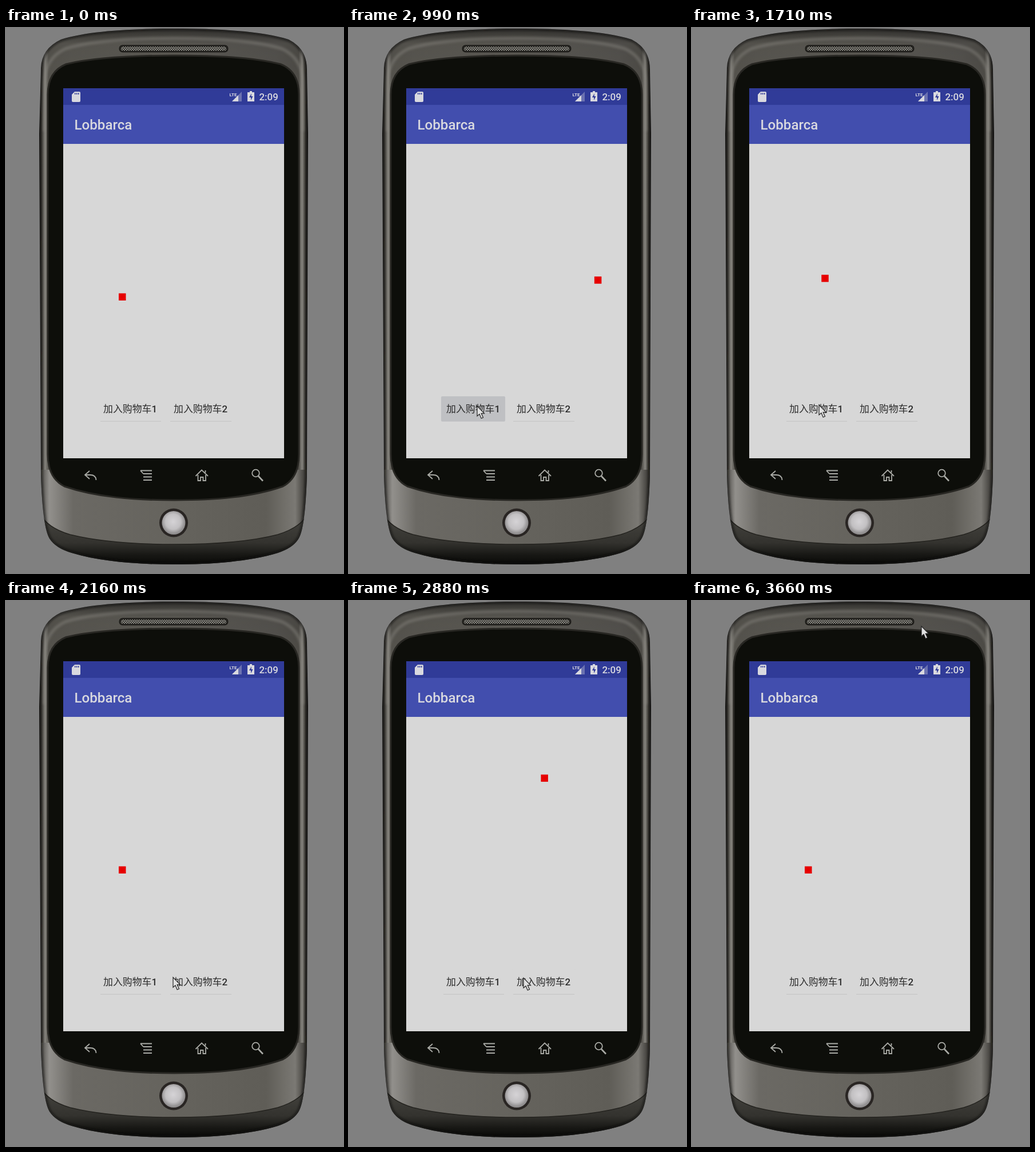
These frames come from a looping animation (589 by 950 pixels, 3690 ms). An HTML page:

```html
<!DOCTYPE html>
<html lang="zh-CN">
<head>
<meta charset="utf-8">
<title>Toss animation</title>
<style>
  html, body { margin: 0; width: 100%; height: 100%; overflow: hidden; background: #808080; }
  svg { display: block; width: 589px; height: 950px; }
  text { font-family: Roboto, "Noto Sans CJK SC", "Noto Sans CJK", sans-serif; font-weight: 500; }
  .nav { fill: none; stroke: #aaaba6; stroke-width: 1.8; }
  .label { font-size: 16.9px; fill: #2c2c2c; }
  .press { fill: #bfc0c3; opacity: 0; }
</style>
</head>
<body>
<svg viewBox="0 0 589 950">
  <defs>
    <linearGradient id="metal" gradientUnits="userSpaceOnUse" x1="58" y1="0" x2="528" y2="0">
      <stop offset="0" stop-color="#171613"/>
      <stop offset=".01" stop-color="#42403b"/>
      <stop offset=".022" stop-color="#85837d"/>
      <stop offset=".035" stop-color="#57554f"/>
      <stop offset=".12" stop-color="#5b5953"/>
      <stop offset=".5" stop-color="#5f5d57"/>
      <stop offset=".88" stop-color="#565450"/>
      <stop offset=".965" stop-color="#4f4d48"/>
      <stop offset=".978" stop-color="#85837d"/>
      <stop offset=".99" stop-color="#3b3934"/>
      <stop offset="1" stop-color="#12110f"/>
    </linearGradient>
    <linearGradient id="topShade" x1="0" y1="0" x2="0" y2="1">
      <stop offset="0" stop-color="#000" stop-opacity=".5"/>
      <stop offset=".25" stop-color="#000" stop-opacity=".08"/>
      <stop offset=".6" stop-color="#000" stop-opacity=".05"/>
      <stop offset="1" stop-color="#000" stop-opacity="0"/>
    </linearGradient>
    <linearGradient id="chin" gradientUnits="userSpaceOnUse" x1="62" y1="0" x2="524" y2="0">
      <stop offset="0" stop-color="#55534f"/>
      <stop offset=".03" stop-color="#92908c"/>
      <stop offset=".12" stop-color="#6b6964"/>
      <stop offset=".5" stop-color="#65635d"/>
      <stop offset=".85" stop-color="#5f5d57"/>
      <stop offset=".96" stop-color="#7b7974"/>
      <stop offset="1" stop-color="#3a3834"/>
    </linearGradient>
    <linearGradient id="foot" gradientUnits="userSpaceOnUse" x1="0" y1="850" x2="0" y2="936">
      <stop offset="0" stop-color="#464540"/>
      <stop offset=".55" stop-color="#33322e"/>
      <stop offset=".8" stop-color="#171714"/>
      <stop offset="1" stop-color="#090907"/>
    </linearGradient>
    <radialGradient id="ball" cx=".48" cy=".45">
      <stop offset="0" stop-color="#d5d3d6"/>
      <stop offset=".65" stop-color="#c2c0c2"/>
      <stop offset="1" stop-color="#918f90"/>
    </radialGradient>
    <pattern id="mesh" width="4" height="4" patternUnits="userSpaceOnUse">
      <path fill="#96958f" d="M0 0h2v2H0zM2 2h2v2H2z"/>
    </pattern>
    <filter id="soft" x="-10%" y="-10%" width="120%" height="120%"><feGaussianBlur stdDeviation="2"/></filter>
    <path id="body" d="M58 184L61 70Q62 36 96 20C142 5 220 1 294 1S448 5 494 20Q526 36 526 72L528 184L526 780Q523 870 512 889Q503 906 475 915C425 930 360 935 294 935S165 930 115 915Q87 907 76 890Q64 870 61 780Z"/>
    <clipPath id="bodyClip"><use href="#body"/></clipPath>
    <path id="face" d="M73 116Q73 76 105 63C155 51 220 48 294 48S430 51 480 63Q512 76 512 116V743Q512 784 484 799C430 818 365 823 294 823S158 818 102 799Q73 784 73 743Z"/>
  </defs>

  <rect width="589" height="950" fill="#808080"/>
  <g clip-path="url(#bodyClip)">
    <use href="#body" fill="url(#metal)"/>
    <rect x="58" width="470" height="110" fill="url(#topShade)"/>
    <path d="M67 180V94Q69 52 104 36C150 22 220 18 294 18S436 22 482 36Q517 52 519 94V180" fill="none" stroke="#8a8882" stroke-width="5" opacity=".5" filter="url(#soft)"/>
    <path d="M55 770H531V940H55Z" fill="url(#chin)"/>
    <path d="M58 842Q68 870 112 883C165 896 230 900 294 900S425 896 475 883Q518 870 530 842V940H58Z" fill="url(#foot)"/>
    <path d="M58 842Q68 870 112 883C165 896 230 900 294 900S425 896 475 883Q518 870 530 842" fill="none" stroke="#24231f" stroke-width="1.5"/>
    <use href="#body" fill="none" stroke="#11100e" stroke-width="5" opacity=".75" filter="url(#soft)"/>
  </g>
  <use href="#face" fill="#0d0e0a" stroke="#282723" stroke-width="3"/>
  <rect x="198.5" y="30.5" width="189" height="11" rx="5" fill="#292824" stroke="#1e1d1a" stroke-width="2"/>
  <rect x="201" y="32.5" width="184" height="7" rx="3.5" fill="url(#mesh)"/>
  <circle cx="293" cy="862.5" r="25" fill="#292523"/>
  <circle cx="293" cy="862.5" r="20.5" fill="url(#ball)"/>

  <g class="nav">
    <path d="M146 772L138 779L146 786M138 779H147Q157 779 157.500 788"/>
    <path d="M235 771.500H255M240 777H255M240 782.500H255M240 788H255M235 771.500L240 777"/>
    <path d="M331.500 781L342 770.500L353 781M335.500 779V789H340V783H344.500V789H349V779M348.500 775V771"/>
    <circle cx="436.500" cy="776" r="6.300"/>
    <path d="M441 781L449 789.500" stroke-width="2.600"/>
  </g>

  <rect x="100" y="105" width="386" height="645" fill="#d7d7d7"/>
  <rect x="100" y="105" width="386" height="97" fill="#424eae"/>
  <rect x="100" y="105" width="386" height="29" fill="#303b98"/>
  <g fill="#d9d9df">
    <path d="M120 111H128Q130 111 130 113V127Q130 129 128 129H117Q115 129 115 127V116Z"/>
    <path d="M120 113h1.500v3h-1.500zM123 113h1.500v3h-1.500zM126 113h1.500v3h-1.500z" fill="#303b98"/>
    <text x="390.500" y="118.500" font-size="8" style="font-weight:700" textLength="">LTE</text>
    <path d="M395 128L412 111V128Z" opacity=".35"/>
    <path d="M395 128L406 117V128Z"/>
    <path d="M422 112H426V110H430V112H434V128H422Z"/>
    <path d="M429 114L425 121H428V126L431.500 119H428.500Z" fill="#303b98"/>
    <text x="442.500" y="126" font-size="16.900">2:09</text>
    <text x="119.500" y="177" font-size="24.100">Lobbarca</text>
  </g>

  <path d="M165 685.500H271M287 685.500H394" stroke="#c3c3c3"/>
  <rect class="press" x="161" y="642" width="112" height="44" rx="2"/>
  <rect class="press" x="284.500" y="642" width="112" height="44" rx="2"/>
  <text class="label" x="170" y="670">加入购物车1</text>
  <text class="label" x="293" y="670">加入购物车2</text>
  <rect id="item" x="197" y="462.500" width="12.500" height="12.500" fill="#e60000"/>
  <path id="cursor" d="M0 0V17.500L4 14L7.200 21.500L10.500 20L7.200 12.800H12.500Z" fill="#e2e2e2" stroke="#252525" stroke-width="1.200"/>
</svg>
<script>
  const LOOP = 3690, STEP = 30, FLIGHT = 917, SPAN = 258;
  const tosses = [{ start: 897, height: 80.4 }, { start: 2455, height: 160.8 }];
  // time, x, y
  const route = [
    [30, 500, 47], [630, 224, 659], [1020, 224, 659], [1710, 222, 657], [2160, 292, 656],
    [2370, 333, 657], [2640, 333, 657], [2880, 305, 657], [3240, 487, 18], [3660, 401, 44]
  ];
  const item = document.getElementById('item');
  const cursor = document.getElementById('cursor');
  const presses = document.querySelectorAll('.press');

  const clamp = v => Math.min(1, Math.max(0, v));
  const move = (el, x, y) => el.setAttribute('transform', `translate(${x.toFixed(2)} ${y.toFixed(2)})`);

  function pointer(t) {
    const i = Math.max(1, route.findIndex(p => p[0] >= t));
    const [t0, x0, y0] = route[i - 1], [t1, x1, y1] = route[i];
    const f = clamp((t - t0) / (t1 - t0)), e = f * f * (3 - 2 * f);
    return [x0 + (x1 - x0) * e, y0 + (y1 - y0) * e];
  }

  function draw() {
    const t = Math.floor(performance.now() % LOOP / STEP) * STEP;
    let x = 0, y = 0;
    tosses.forEach(({ start, height }, i) => {
      const age = t - start;
      if (age >= 0 && age < FLIGHT) {
        const u = 1 - age / FLIGHT;
        x = SPAN * u;
        y = -4 * height * u * (1 - u);
      }
      presses[i].style.opacity = Math.min(clamp((age + 130) / 100), clamp((430 - age) / 300));
    });
    move(item, x, y);
    move(cursor, ...pointer(t));
    cursor.style.visibility = t < route[0][0] ? 'hidden' : 'visible';
    requestAnimationFrame(draw);
  }
  draw();
</script>
</body>
</html>
```
